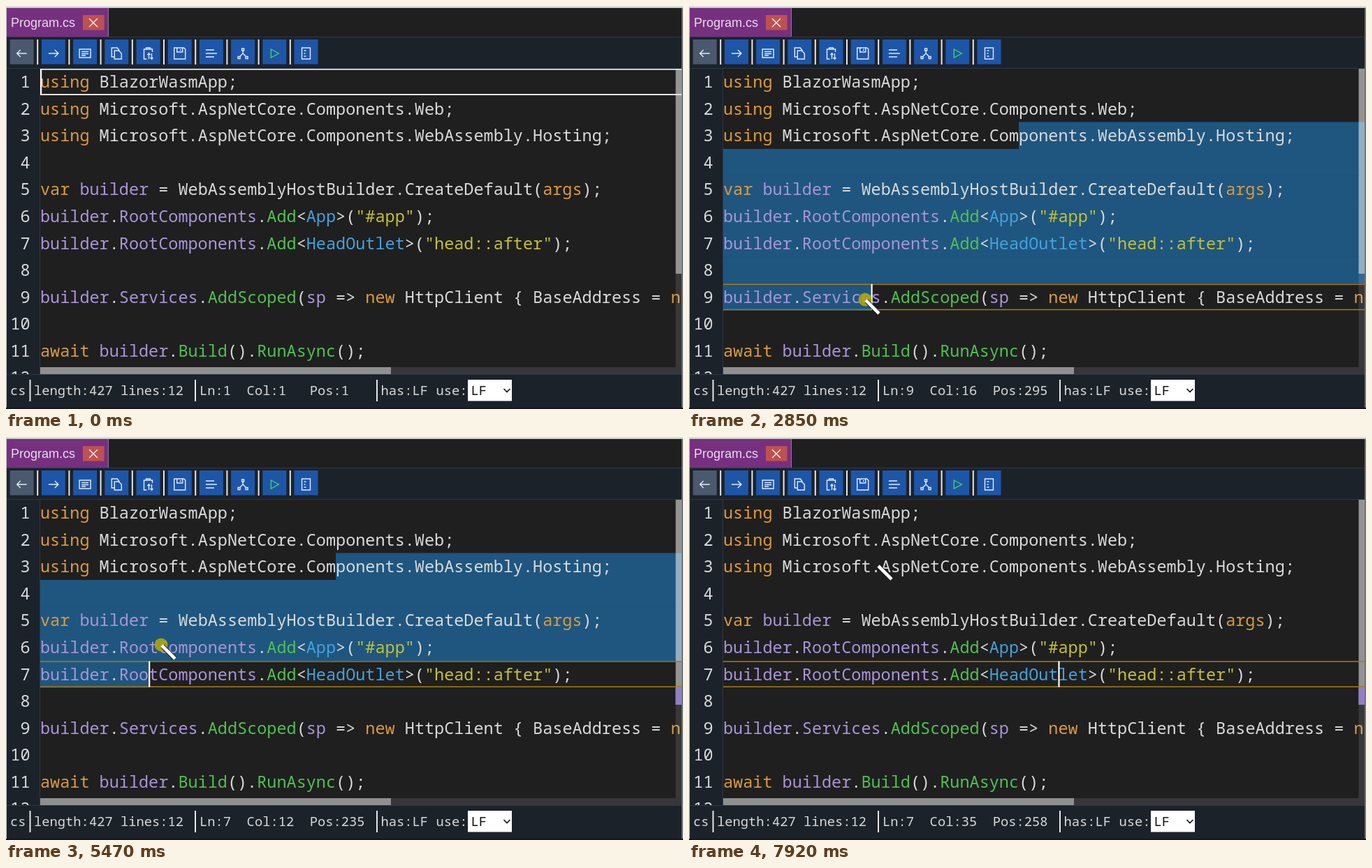
These frames come from a looping animation (969 by 578 pixels, 7990 ms). An HTML page:

```html
<!DOCTYPE html>
<html lang="en">
<head>
<meta charset="utf-8">
<title>Code editor</title>
<style>
  html, body { margin: 0; width: 100%; height: 100%; overflow: hidden; background: #1c222a; }
  svg { display: block; width: 100%; height: 100%; }
  text { white-space: pre; font-family: "Noto Sans Mono", "DejaVu Sans Mono", monospace; fill: #dadada; }
  .code { font-size: 23.5px; }
  .status { font-size: 18.8px; }
  .tab { font: 18px "Liberation Sans", Arial, sans-serif; fill: #eadcec; }
  .keyword { fill: #dc9a3d; }
  .name { fill: #a994d9; }
  .method { fill: #4fc151; }
  .type { fill: #43a2dc; }
  .string { fill: #c3c134; }
  .icon { fill: none; stroke: #e4ebf5; stroke-width: 1.4; }
</style>
</head>
<body>
<svg id="stage" viewBox="0 0 969 578">
  <rect width="969" height="578" fill="#1c222a"/>
  <rect width="969" height="44" fill="#1f1f1f"/>
  <rect x="1" y="3" width="146" height="41" fill="#76307f"/>
  <path d="M146.500 3V44" stroke="#8f7a94"/>
  <rect width="969" height="2.800" fill="#dbdeda"/>
  <text class="tab" x="7" y="30">Program.cs</text>
  <rect x="110" y="13" width="30.500" height="21.500" fill="#bd514f"/>
  <path d="M119 18l12 12m0-12l-12 12" stroke="#f3e6e6" stroke-width="1.5"/>
  <g id="toolbar"></g>
  <rect x="49" y="90" width="918" height="428" fill="#1f1f1f"/>
  <path d="M0 44.500H967M0 89.500H967M48.500 90V528" stroke="#2b3945"/>
  <g id="selection" fill="#1f567f"></g>
  <clipPath id="view"><rect width="965.500" height="528"/></clipPath>
  <g id="code" clip-path="url(#view)"></g>
  <rect x="958.500" y="90" width="8.500" height="294" fill="#fff" opacity=".52"/>
  <rect x="958.500" y="384" width="8.500" height="134" fill="#fff" opacity=".11"/>
  <rect id="marker" x="958.500" y="360" width="8.500" height="24" fill="#937fc4"/>
  <rect x="49" y="518" width="918" height="10" fill="#37373b"/>
  <rect x="49" y="518" width="502" height="10" fill="#8f8f8f"/>
  <path id="currentLine" fill="none"/>
  <rect id="caret" width="2.200" height="37" fill="#fff"/>
  <path d="M0 528.500H969" stroke="#2b3945"/>
  <path d="M34.500 536V567M271 536V567M531 536V567" stroke="#e6e6e6" stroke-width="2"/>
  <text class="status" x="6" y="558">cs</text>
  <text class="status" x="40" y="558">length:427 lines:12</text>
  <text class="status" x="277" y="558" id="position"></text>
  <text class="status" x="536.500" y="558">has:LF use:</text>
  <rect x="661" y="536" width="63" height="30.500" fill="#fff"/>
  <text class="status" x="665.500" y="558" style="fill:#111">LF</text>
  <path d="M712.500 549l4.500 4.500l4.500-4.500" fill="none" stroke="#111" stroke-width="1.600"/>
  <path d="M.5 3V576M968 3V576" stroke="#c4c8c8"/>
  <rect y="576" width="969" height="2" fill="#1b141d"/>
  <g id="pointer">
    <circle id="press" r="9.500" fill="#aaa314" opacity=".92"/>
    <path d="M2 2L20 20" stroke="#111" stroke-width="6.500"/>
    <path d="M1 1L20 20" stroke="#fff" stroke-width="4.600"/>
  </g>
</svg>
<script>
const LOOP = 7990, STEP = 70;
const LEFT = 49, TOP = 89.5, CHAR = 14.1, ROW = 38.55, RIGHT = 967;
const $ = id => document.getElementById(id);

function add(parent, tag, attrs, text) {
  const el = document.createElementNS("http://www.w3.org/2000/svg", tag);
  for (const key in attrs) el.setAttribute(key, attrs[key]);
  if (text) el.textContent = text;
  return parent.appendChild(el);
}

const lines = [
  'using BlazorWasmApp;',
  'using Microsoft.AspNetCore.Components.Web;',
  'using Microsoft.AspNetCore.Components.WebAssembly.Hosting;',
  '',
  'var builder = WebAssemblyHostBuilder.CreateDefault(args);',
  'builder.RootComponents.Add<App>("#app");',
  'builder.RootComponents.Add<HeadOutlet>("head::after");',
  '',
  'builder.Services.AddScoped(sp => new HttpClient { BaseAddress = new Uri(builder.HostEnvironment.BaseAddress) });',
  '',
  'await builder.Build().RunAsync();',
  ''
];
const syntax = {
  string: /^".*"$/,
  keyword: /^(using|var|new|await|args)$/,
  name: /^(builder|RootComponents|Services|sp)$/,
  method: /^(Add|AddScoped|Build|RunAsync)$/,
  type: /^(App|HeadOutlet)$/
};

lines.forEach((line, i) => {
  const y = TOP + i * ROW + 27.7;
  add($("code"), "text", { class: "code", x: 34.5, y, "text-anchor": "end" }, String(i + 1));
  const row = add($("code"), "text", { class: "code", x: LEFT, y });
  for (const token of line.match(/"[^"]*"|\w+|[^\w"]+/g) || []) {
    const kind = Object.keys(syntax).find(k => syntax[k].test(token)) || "plain";
    add(row, "tspan", { class: kind }, token);
  }
});

const icons = [
  "M7 0H-7M-2-5L-7 0L-2 5",
  "M-7 0H7M2-5L7 0L2 5",
  "M-8-6H8V6H-8ZM-5-2.500H5M-5 .5H5M-5 3H1",
  "M-3-4H3L7 0V8H-3ZM-3 5H-7V-8H1L4-4",
  "M-2 8H-6V-6H6V-2M-3-6V-8H3V-6M1 8V0L-1 2M1 0L3 2M5 0V8L3 6M5 8L7 6",
  "M-8-8H6L8-6V8H-8ZM-4-8V-2H4V-8M1-6V-4",
  "M-8-5H4M-8 0H8M-8 5H4",
  "M0-4V0L-5 5M0 0L5 5M-1.500-7h3v3h-3ZM-7 4.500h3v3h-3ZM4 4.500h3v3h-3Z",
  "M-5-6L6 0L-5 6Z",
  "M-6-8H6V8H-6ZM-3-4H0M-3 0H-1M-3 4H0"
];
icons.forEach((d, i) => {
  const x = 22.7 + i * 45.2, bar = $("toolbar");
  add(bar, "rect", { x: x - 17, y: 48, width: 34, height: 35.5, fill: i ? "#1d56a9" : "#4a596d" });
  const icon = add(bar, "path", { class: "icon", d, transform: `translate(${x} 68)` });
  if (i === 8) icon.style.stroke = "#4fce58";
  if (i < 9) add(bar, "rect", { x: x + 21.5, y: 48, width: 2, height: 36, fill: "#e4e6e8" });
});

// Pointer path: time, x, y
const path = [
  [190, 935, 549], [940, 215, 125], [1080, 200, 108], [1480, 200, 108],
  [1750, 511, 245], [1820, 511, 245], [1960, 471, 179], [2150, 471, 179],
  [2780, 262, 408], [2850, 252, 421], [3100, 255, 440], [3400, 300, 492],
  [3750, 340, 498], [3890, 445, 500], [3960, 457, 500], [4100, 468, 500],
  [4560, 292, 498], [4650, 285, 496], [5050, 255, 470], [5400, 205, 357],
  [5470, 222, 298], [6150, 400, 150], [6220, 400, 150], [6430, 437, 236],
  [6570, 437, 236], [7040, 500, 300], [7190, 529, 340], [7390, 529, 340],
  [7920, 270, 184]
];
// Button down and up times
const presses = [[1350, 1480], [2150, 6220], [6430, 6570], [7250, 7390]];
// The screen refreshes every STEP ms, counted from these times
const ticks = [0, 190, 1010, 1820, 2150, 2980, 3820, 4650, 5470, 6290, 7110, 7920];

function pointerAt(t) {
  const i = path.findIndex(p => p[0] >= t);
  if (i < 0) return path[path.length - 1].slice(1);
  if (i === 0) return path[0].slice(1);
  const [t0, x0, y0] = path[i - 1], [t1, x1, y1] = path[i];
  const k = (t - t0) / (t1 - t0);
  return [x0 + (x1 - x0) * k, y0 + (y1 - y0) * k];
}

function cellAt(t) {
  const [x, y] = pointerAt(t);
  const row = Math.max(0, Math.min(10, Math.floor((y - TOP) / ROW)));
  const col = Math.max(0, Math.min(lines[row].length, Math.round((x - LEFT) / CHAR)));
  return { row, col };
}

const offset = ({ row, col }) => lines.slice(0, row).reduce((sum, l) => sum + l.length + 1, col);
const columnX = col => LEFT + col * CHAR;

function drawSelection(from, to) {
  const group = $("selection");
  group.replaceChildren();
  if (offset(from) === offset(to)) return;
  const [a, b] = offset(from) < offset(to) ? [from, to] : [to, from];
  for (let row = a.row; row <= b.row; row++) {
    const x = row === a.row ? columnX(a.col) : LEFT;
    const end = row === b.row ? columnX(b.col) : RIGHT;
    if (end > x) add(group, "rect", { x, y: TOP + row * ROW - 0.2, width: end - x, height: ROW + 0.4 });
  }
}

function draw(t) {
  const tick = ticks.filter(s => s <= t).pop();
  const now = tick + Math.floor((t - tick) / STEP) * STEP;
  const press = presses.filter(p => p[0] <= now).pop();
  let from = { row: 0, col: 0 }, head = from;
  if (press) {
    from = cellAt(press[0]);
    head = cellAt(Math.max(press[0], Math.min(now - STEP, press[1])));
  }
  drawSelection(from, head);

  const y = TOP + head.row * ROW;
  const line = $("currentLine");
  line.setAttribute("d", press
    ? `M49 ${y + 1.3}H${RIGHT}M49 ${y + 37.5}H${RIGHT}`
    : `M${RIGHT} ${y + 1.3}H50V${y + 37.5}H${RIGHT}`);
  line.setAttribute("stroke", press ? "#a97b14" : "#e2e2e2");
  line.setAttribute("stroke-width", press ? 1.5 : 1.8);
  $("caret").setAttribute("x", columnX(head.col));
  $("caret").setAttribute("y", y + 0.8);

  const ln = String(head.row + 1).padEnd(3), col = String(head.col + 1).padEnd(4);
  $("position").textContent = `Ln:${ln}Col:${col}Pos:${offset(head) + 1}`;

  const [px, py] = pointerAt(now);
  $("pointer").setAttribute("transform", `translate(${px} ${py})`);
  $("pointer").style.display = now < 190 ? "none" : "";
  $("press").style.display = press && now <= press[1] ? "" : "none";
  $("marker").style.display = now >= 5400 ? "" : "none";
}

function frame() {
  draw(performance.now() % LOOP);
  requestAnimationFrame(frame);
}
frame();
</script>
</body>
</html>
```
